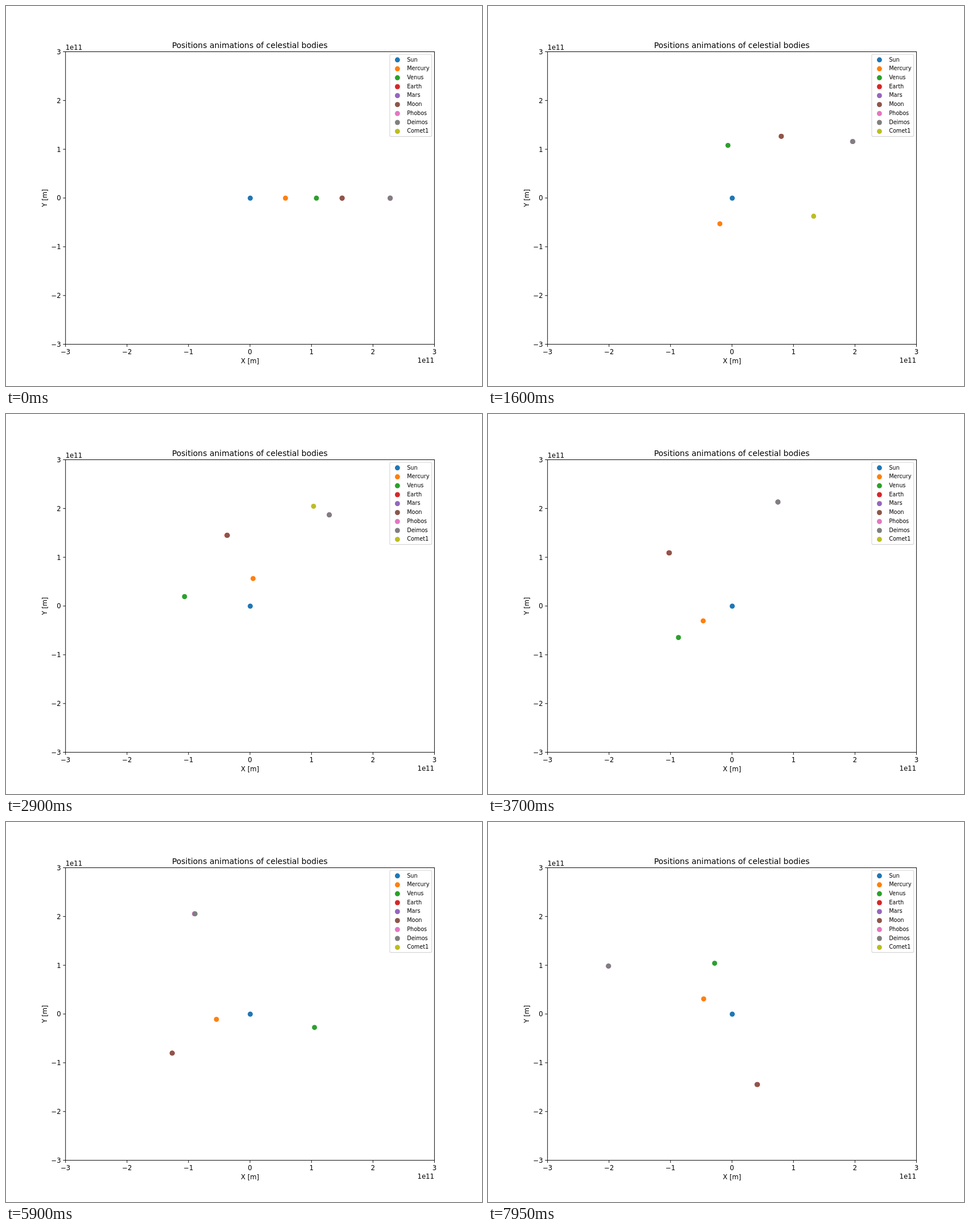
Animation of 837 by 669 pixels, one loop 8000 ms. Source, as an HTML page:

```html
<!DOCTYPE html>
<html lang="en">
<head>
<meta charset="utf-8">
<title>Positions animations of celestial bodies</title>
<style>
  html, body { margin: 0; width: 100%; height: 100%; overflow: hidden; background: #fff; }
  svg { display: block; width: 837px; height: 669px; }
  text { font-family: "DejaVu Sans", sans-serif; font-size: 11.63px; fill: #000; }
</style>
</head>
<body>
<svg id="stage" viewBox="0 0 837 669">
  <defs><clipPath id="plot"><rect x="105" y="80.5" width="648.3" height="515"/></clipPath></defs>
  <g id="bodies" clip-path="url(#plot)"></g>
  <g id="axes" stroke="#000" stroke-width="0.95" fill="none"></g>
  <g id="labels"></g>
  <g id="legend"></g>
</svg>
<script>
const LOOP = 8000, STEP = 50, SCALE = 0.837;
const LEFT = 104.7, RIGHT = 753.4, TOP = 80.5, BOTTOM = 595.6;
const MID_X = (LEFT + RIGHT) / 2, MID_Y = (TOP + BOTTOM) / 2;
const UNIT_X = (RIGHT - LEFT) / 6, UNIT_Y = (BOTTOM - TOP) / 6;

// Lengths in 1e11 m, time in steps of 1/200 year
const DT = 365.25 * 86400 / 200;
const MU = 1.32712e-13 * DT * DT;

const $ = id => document.getElementById(id);
function add(parent, tag, attrs, text) {
  const el = document.createElementNS("http://www.w3.org/2000/svg", tag);
  for (const k in attrs) el.setAttribute(k, attrs[k]);
  if (text !== undefined) el.textContent = text;
  parent.appendChild(el);
  return el;
}

// Orbit starting on the x axis at distance r with upward speed v (km/s)
function orbit(r, v) {
  const speed = v * 1e-8 * DT;
  const e = r * speed * speed / MU - 1;
  const a = r / (1 - e), b = a * Math.sqrt(1 - e * e);
  const rate = Math.sqrt(MU / a ** 3);
  return n => {
    const m = rate * n;
    let E = m;
    for (let i = 0; i < 6; i++) E -= (E - e * Math.sin(E) - m) / (1 - e * Math.cos(E));
    return [a * (Math.cos(E) - e), b * Math.sin(E)];
  };
}

// Clockwise hyperbolic flyby: closest at step n0, in direction w
function flyby(a, e, n0, w) {
  const b = a * Math.sqrt(e * e - 1), rate = Math.sqrt(MU / a ** 3);
  const c = Math.cos(w), s = Math.sin(w);
  return n => {
    const m = rate * (n - n0);
    let H = Math.asinh(m / e);
    for (let i = 0; i < 20; i++) H -= (e * Math.sinh(H) - H - m) / (e * Math.cosh(H) - 1);
    const x = a * (e - Math.cosh(H)), y = b * Math.sinh(H);
    return [x * c + y * s, x * s - y * c];
  };
}

// Small circle around a planet, period in steps
function moon(planet, r, period) {
  return n => {
    const [x, y] = planet(n), q = 2 * Math.PI * n / period;
    return [x + r * Math.cos(q), y + r * Math.sin(q)];
  };
}

const earth = orbit(1.496, 29.79), mars = orbit(2.28, 24);
const bodies = [
  ["Sun", "#1f77b4", () => [0, 0]],
  ["Mercury", "#ff7f0e", orbit(0.579, 47.36)],
  ["Venus", "#2ca02c", orbit(1.082, 35.02)],
  ["Earth", "#d62728", earth],
  ["Mars", "#9467bd", mars],
  ["Moon", "#8c564b", moon(earth, 0.00384, 14.96)],
  ["Phobos", "#e377c2", moon(mars, 0.0001, 0.175)],
  ["Deimos", "#7f7f7f", moon(mars, 0.00023, 0.69)],
  ["Comet1", "#bcbd22", flyby(0.294, 1.1988, 41.25, -154.9 * Math.PI / 180)]
];

const dot = (parent, fill, cx = 0, cy = 0) => add(parent, "circle", { r: 4.45, fill, cx, cy });
const label = (text, x, y, anchor = "middle", more = {}) =>
  add($("labels"), "text", { x, y, "text-anchor": anchor, ...more }, text);

function drawAxes() {
  const axes = $("axes");
  add(axes, "rect", { x: LEFT, y: TOP, width: RIGHT - LEFT, height: BOTTOM - TOP });
  for (let k = -3; k <= 3; k++) {
    const x = MID_X + k * UNIT_X, y = MID_Y - k * UNIT_Y;
    const name = String(k).replace("-", "\u2212");
    add(axes, "path", { d: `M${x} ${BOTTOM}v4.4M${LEFT} ${y}h-4.4` });
    label(name, x, 612.7);
    label(name, 96.7, y + 4.3, "end");
  }
  label("1e11", LEFT, 77, "start");
  label("1e11", RIGHT - 0.5, 628.3, "end");
  label("X [m]", MID_X, 629);
  label("Y [m]", 0, 0, "middle", { transform: `translate(71.8 ${MID_Y}) rotate(-90)` });
  label("Positions animations of celestial bodies", MID_X - 0.3, 73.6, "middle", { style: "font-size:13.95px" });
}

function drawLegend() {
  const legend = $("legend");
  add(legend, "rect", {
    x: 674.8, y: 85.3, width: 73.8, height: 144.3, rx: 2,
    fill: "#fff", "fill-opacity": 0.8, stroke: "#ccc", "stroke-opacity": 0.8, "stroke-width": 1.1
  });
  bodies.forEach(([name, color], i) => {
    const y = 94.8 + 15.74 * i;
    dot(legend, color, 688.3, y);
    add(legend, "text", { x: 705.2, y: y + 2.7, style: "font-size:9.69px" }, name);
  });
}

drawAxes();
drawLegend();
const dots = bodies.map(([, color]) => dot($("bodies"), color));

function render(t) {
  const n = Math.floor((t % LOOP) / STEP);
  bodies.forEach(([, , place], i) => {
    const [x, y] = place(n);
    // markers sit on a slightly finer pixel grid
    dots[i].setAttribute("cx", Math.round(512.5 + x * 775 / 6) * SCALE + 0.1);
    dots[i].setAttribute("cy", Math.round(404 - y * 616 / 6) * SCALE + 0.1);
  });
}

let start;
function tick(now) {
  if (start === undefined) start = now;
  render(Math.max(0, now - start));
  requestAnimationFrame(tick);
}
render(0);
requestAnimationFrame(tick);
</script>
</body>
</html>
```
